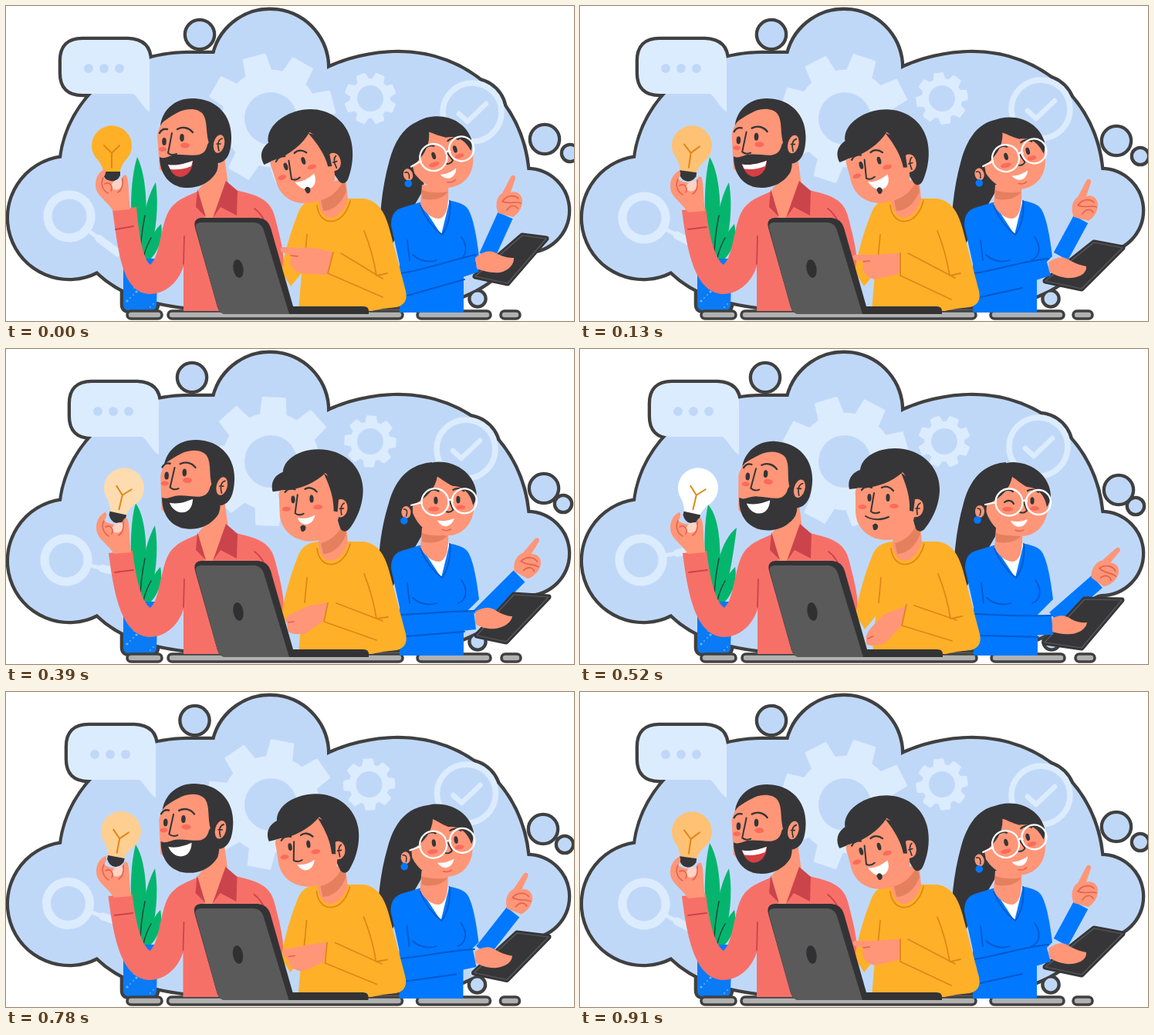
These frames come from a looping animation (736x409 px, 1.04 s). An HTML page:

```html
<!DOCTYPE html>
<html lang="en">
<head>
<meta charset="utf-8">
<title>Team at work</title>
<style>
html, body { margin: 0; width: 100%; height: 100%; overflow: hidden; background: #fff; }
svg { display: block; width: 736px; height: 409px; }
</style>
</head>
<body>
<svg id="stage" viewBox="0 0 736 409" fill="none" stroke-linecap="round" stroke-linejoin="round"></svg>
<script>
const stage = document.getElementById('stage');
const STEP = 130;
const SWING = [0, 1, 2, 3, 4, 3, 2, 1];
const INK = '#404040', HAIR = '#363638', SKY = '#c0d8f8', PALE = '#dcecff';
const SKIN = '#ff9678', SHADE = '#e5805f', BLUSH = '#fa6b5c', FOLD = '#e4614f';
const RED = '#f77068', WINE = '#cb444b', GOLD = '#ffb029', OCHRE = '#df8717';
const BLUE = '#0078ff', NAVY = '#0059cc', WHITE = '#fff';
let pose = 0;

// Mean of two strings, number by number
function mid(a, b) {
  const nums = String(b).match(/-?[\d.]+/g);
  let i = 0;
  return String(a).replace(/-?[\d.]+/g, n => (+n + +nums[i++]) / 2);
}
// Value for the current pose; the middle pose lies between b and c
const at = (a, b, c, d) => [a, b, mid(b, c), c, d][pose];

const path = (d, fill) => `<path d="${d}" fill="${fill}"/>`;
const line = (d, color, w = 2) => `<path d="${d}" stroke="${color}" stroke-width="${w}"/>`;
const dot = (xy, r, fill) => {
  const [x, y] = String(xy).split(',');
  return `<circle cx="${x}" cy="${y}" r="${r}" fill="${fill}"/>`;
};
const oval = (x, y, rx, ry, fill, turn = 0) =>
  `<ellipse cx="${x}" cy="${y}" rx="${rx}" ry="${ry}" fill="${fill}" transform="rotate(${turn} ${x} ${y})"/>`;
const ring = (x, y, r, color, w) =>
  `<circle cx="${x}" cy="${y}" r="${r}" stroke="${color}" stroke-width="${w}"/>`;
const group = (transform, ...parts) => `<g transform="${transform}">${parts.join('')}</g>`;

function gear(place, turn, body, hole, tip, half) {
  let teeth = '';
  for (let i = 0; i < 8; i++) {
    teeth += `<path d="M${body - 5},${-half - 2}L${tip},${-half}V${half}L${body - 5},${half + 2}Z" fill="${PALE}" stroke="${PALE}" stroke-width="3" transform="rotate(${i * 45})"/>`;
  }
  return group(`translate(${place}) rotate(${turn})`, teeth, ring(0, 0, (body + hole) / 2, PALE, body - hole));
}

function backdrop() {
  const cloud = 'M72,197.6C82,120 150,62 235,62Q254,62 270.2,62.1A74 74 0 0 1 416,82C440,70 475,61 508,61' +
    'C598,61 668,126 675.5,213A52.5 52.5 0 0 1 675.5,318C652,322 645,352 600,372L560,390H230' +
    'C190,385 150,375 118.1,344.1A78 78 0 1 1 72,197.6Z';
  const bubble = 'M99,44H158Q186,45 186,72V137C178,133 174,122 165,114H99Q72,114 72,87V71Q72,44 99,44Z';
  const slide = `translate(${at(0, 4, 12, 20)} 0)`;
  const check = at('604,138', '597,134', '596,130', '594,127');
  const pot = 'M152,328H197L195,389Q194,395 188,395H159Q152,395 152,387Z';
  const blobs = [
    path(cloud, SKY),
    dot(at('251,37', '248,37', '241,37', '240,37'), 17, SKY),
    dot(at('698,173', '695,175', '697,181', '698,183'), 17, SKY),
    dot(at('731,191', '726,195', '722,201', '720,204'), 9, SKY),
    dot(at('611,380', '610,380', '611,380', '611,380'), 8.5, SKY),
    dot(check, 42, SKY)
  ].join('');
  const potShape = path(pot, '#0a7af5');
  const tip = at('170,196', '168,196', '168,200', '166,202');
  const tip2 = at('194,229', '193,229', '193,229', '203,232');
  const tip3 = at('201,283', '200,283', '200,283', '201,283');
  let specks = '';
  for (let i = 0; i < 16; i++) {
    specks += dot(`${156 + (i * 17) % 38},${338 + (i * 29) % 54}`, i % 3 ? 0.9 : 1.6, '#6db8ff');
  }
  return `<g stroke="${INK}" stroke-width="8.6">${blobs}${group(slide, path(bubble, PALE))}${potShape}</g>` +
    blobs +
    gear('343,146', at(-15, -27, -42, -62), 63, 34, 82, 14) +
    gear(at('472,120', '469,120', '472,120', '472,120'), at(-22, -8, 3, 23), 26, 17, 32, 5) +
    group(`translate(${check})`, ring(0, 0, 38, PALE, 7.5), line('M-17,2L-6,12L18,-11', PALE, 6.5)) +
    group(`translate(${at('82,273', '83,275', '78,274', '79,274')}) rotate(${at(37, 28, 13, -11)})`,
      ring(0, 0, 28, PALE, 11), line('M33,0H48', PALE, 5), line('M48,0H79', PALE, 10)) +
    group(slide, path(bubble, PALE), [107, 127, 147].map(x => dot(`${x},81`, 6, SKY)).join('')) +
    path(`M173,330C158,290 160,228 ${tip}C182,220 185,265 178,330Z`, '#05b56d') +
    path(`M175,330C173,290 181,250 ${tip2}C199,265 193,305 182,330Z`, '#05b56d') +
    path(`M177,330C182,309 190,294 ${tip3}C204,302 197,319 186,330Z`, '#05b56d') +
    line('M180,272C176,292 174,305 174,326M188,301C184,308 180,318 178,327', '#24463c', 1.5) +
    potShape + specks;
}

function desk() {
  const bars = [[157, 45], [at(210, 209, 210, 210), 304], [at(533, 532, 533, 533), 95], [at(641, 639, 642, 642), 25]];
  return bars.map(([x, w]) =>
    `<rect x="${x}" y="396" width="${w}" height="10" rx="5" fill="#b1b1b1" stroke="${INK}" stroke-width="3.6"/>`).join('');
}

function bulb() {
  const glow = at('rgb(255,176,38)', 'rgb(255,193,115)', 'rgb(255,220,176)', 'rgb(255,255,255)');
  return group(`translate(${at('137,181', '146,181', '153,180', '153,180')}) rotate(${at(0, 8, 13, 13)})`,
    path('M-10,37Q-11,29 -17,20A26 26 0 1 1 17,20Q11,29 10,37Z', glow),
    line('M-10,0L0,10L10,0M0,10V29', OCHRE, 2),
    path('M-11,34H11V39Q7,47 0,47Q-7,47 -11,39Z', HAIR));
}

function bulbHand() {
  return group(`translate(${at('0,0', '2,2', '1,0', '1,0')})`,
    path('M139,266C128,250 116,246 116,232C116,223 120,216 127,212C131,213 129,219 126,223C132,227 140,229 149,227C151,221 153,218 156,220C160,230 158,240 161,264Z', SKIN),
    oval(144, 232, 8, 6, '#ffd3c4', -35),
    line('M126,223C122,230 125,239 132,243M128,231C135,227 139,235 136,240M151,224C152,234 150,239 145,242', FOLD, 1.6));
}

function beardedMan() {
  const cuff = 'M133,265L164,262C168,295 175,328 187,336C199,326 200,290 209,270';
  const torso = 'C217,252 235,247 250,240L298,239C326,246 343,250 349,276C353,292 357,306 359,322L364,396H230V338C222,362 204,374 186,374C150,372 ';
  const low = cuff + torso + '140,320 133,265Z';
  const high = 'M138,265L169,261C172,295 177,328 187,336C199,326 200,290 209,270' + torso + '146,320 138,265Z';
  const open = pose < 2;
  const mouth = open
    ? path('M210,206C222,208 233,204 242,201C242,214 234,222 225,222C217,221 213,214 210,206Z', '#d63f43') +
      path('M210,206C222,208 233,204 242,201L240,208C231,212 222,213 213,212Z', WHITE)
    : path('M209,203C220,205 230,201 239,197C239,209 233,215 225,215C218,215 212,210 209,203Z', WHITE);
  return path(at(high, low, low, low), RED) +
    line(at('M142,290L165,286', 'M141,290L165,287', 'M141,290L165,287', 'M141,290L165,287'), WINE, 1.8) +
    line('M231,299L230,335M322,263C333,271 340,287 344,306', WINE, 1.8) +
    path('M249,239L283,196L288,232L268,275L258,275Z', SKIN) +
    path('M285,227L300,240L299,272L278,261L268,275Z', WINE) +
    path('M248,238L259,274L246,261Z', WINE) +
    group(`translate(${at(0, 1, 3, 7)} ${at(0, 0, -2, 0)}) rotate(${at(0, 1, 2, 4)} 245 200)`,
      path('M200,156C202,136 218,120 241,120C273,120 292,142 292,170C292,190 287,201 276,204L255,200L220,150Z', HAIR),
      path('M196,168C198,157 202,151 207,148C214,143 219,140 225,137C237,132 249,133 255,140C262,150 258,166 264,181L262,215L225,236L199,212Z', SKIN),
      path('M199,196C206,200 212,193 222,193C240,192 257,200 261,180L268,168C274,188 277,204 273,215C264,231 247,237 233,236C212,235 199,218 199,196Z', HAIR),
      oval(276, 179, 7, 12, SKIN, 12),
      line('M280,172C274,174 274,181 276,188M273,179H278', HAIR, 1.7),
      group(`translate(${at('0,0', '0,-1', '-1,-8', '3,-8')})`,
        oval(232, 181, 6, 3.5, BLUSH), oval(203, 186, 5, 3, BLUSH),
        oval(205, 176, 2.8, 5, HAIR), oval(228, 171, 2.8, 5, HAIR),
        line('M199,165C201,161 204,159 209,160M222,160C229,156 237,158 242,164', HAIR, 2.4),
        line('M215,165L210,191Q215,195 221,192', HAIR, 2)),
      mouth) +
    bulb() + bulbHand();
}

function laptop() {
  return path('M253,275H327Q339,276 343,288L372,390H463Q470,390 470,396V400H285Q277,400 274,391L245,288Q242,276 253,275Z', '#333335') +
    path('M252,281H322Q331,282 334,291L367,400H285Q277,400 274,391L246,289Q244,282 252,281Z', '#5a5a5a') +
    oval(301, 341, 6.5, 12, '#303032', -10);
}

function youngMan() {
  const mouth = pose < 2
    ? path('M373,216C383,219 391,217 400,213C401,224 395,230 388,230C381,230 376,224 373,216Z', WHITE)
    : pose < 4
      ? path('M377,217C385,219 392,218 400,214C398,222 393,226 387,226C382,225 379,222 377,217Z', WHITE)
      : line('M370,217C378,222 390,223 400,218', HAIR, 2);
  const chin = at(10, 7, 4, 0);
  return path('M405,250C390,251 382,258 378,270C368,295 361,320 357,345L369,364L383,347L379,396H474C490,392 498,392 506,391C518,388 520,380 518,370L497,290C490,264 480,252 463,250Z', GOLD) +
    line('M390,297L387,329M464,292C472,312 477,331 480,350', OCHRE, 1.8) +
    path('M406,235L405,256C408,280 432,284 443,251L440,222Z', SKIN) +
    path('M408,252C422,249 432,238 438,225L441,240C436,255 424,266 411,266Z', SHADE) +
    line('M403,259C406,287 437,288 446,253', OCHRE, 1.8) +
    path(at(
      'M424,320C407,315 394,313 384,314L358,313C354,314 355,319 359,320L371,324C364,333 371,345 383,347L416,349Z',
      'M416,321C405,321 394,322 384,323L357,323C353,324 354,329 358,330L369,332C364,342 370,352 383,355L414,348Z',
      'M417,329C405,332 394,332 384,337L367,345C362,348 361,352 364,355L365,365C366,370 377,371 387,370L410,354Z',
      'M423,333C413,339 401,340 392,346L380,359C374,365 370,371 371,377L371,383C375,386 386,386 395,382L417,359Z'), SKIN) +
    line(at('M369,324L378,325', 'M368,332L376,331', 'M366,355L373,354', 'M373,376L380,373'), FOLD, 1.6) +
    line(at(
      'M424,320L417,347L488,378M434,321L488,354M481,350L494,347',
      'M416,321L416,350L482,381M426,321L487,353M481,350L494,347',
      'M417,330L412,354L480,378M428,330L488,353M481,350L495,348',
      'M423,332L417,359L482,379M433,333L488,352M481,350L495,347'), OCHRE, 1.8) +
    group(`translate(${at('-13,12', '-10,11', '-3,2', '0,0')}) rotate(${at(-18, -15, -2, 0)} 386 193)`,
      path('M349,182C346,168 354,160 363,157C365,140 385,129 408,129C441,129 466,152 466,182C466,203 456,222 447,233C443,238 438,238 435,233L425,200L368,180Z', HAIR),
      path('M357,192C356,181 358,179 364,181C385,180 405,172 418,160C425,166 428,185 431,197C437,192 446,196 445,207C444,216 438,219 433,218C430,237 418,248 398,248C374,248 357,232 357,210Z', SKIN),
      path('M416,161C428,166 434,183 434,195L432,211L427,210C428,195 424,179 416,161Z', HAIR),
      line('M441,200C436,202 436,208 437,215M435,207H440', HAIR, 1.7),
      oval(366, 205, 5.5, 3, BLUSH), oval(407, 204, 6, 3, BLUSH),
      oval(375, 193, 2.6, 5, HAIR), oval(399, 193, 2.6, 5, HAIR),
      line('M365,183C368,179 373,178 378,180M391,180C396,177 402,179 406,184', HAIR, 2.3),
      line('M381,187L377,211Q382,215 388,212', HAIR, 2),
      group(`translate(${chin * 0.7} 0)`, mouth),
      path(`M${379 + chin},229Q${383 + chin},224 ${386 + chin},229C${387 + chin},234 ${382 + chin},237 ${380 + chin},234Z`, HAIR));
}

function glassesWoman() {
  const wink = pose === 4;
  const tablet = at('M669,298L700,302L650,360L608,351Z', 'M667,307L704,314L651,367L604,357Z',
    'M658,319L703,322L648,380L610,372Z', 'M654,325L702,326L650,388L602,381Z');
  const forearm = at('M623,325L647,272', 'M624,325L650,277', 'M612,348L665,295', 'M615,350L670,302');
  return path(at(
      'M546,147C516,150 503,178 497,200C488,232 485,262 484,292L500,310L540,240L550,170Z',
      'M544,147C514,150 501,178 495,200C486,232 483,262 482,290L500,310L540,240L550,170Z',
      'M552,147C516,150 502,178 496,200C486,232 483,262 482,290L500,310L540,240L550,170Z',
      'M552,147C516,150 503,178 497,200C488,232 485,262 484,292L500,310L540,240L550,170Z'), HAIR) +
    `<path d="${forearm}" stroke="${BLUE}" stroke-width="21" stroke-linecap="butt"/>` +
    group(`translate(${at('647,272', '650,277', '667,294', '670,303')}) rotate(${at(0, 0, 13, 21)})`,
      path('M-9,-3C-14,-13 -11,-25 -4,-29L7,-50C9,-54 14,-52 13,-48L7,-30C15,-33 22,-27 22,-19C22,-9 16,-2 10,2Z', SKIN),
      line('M-4,-18C2,-27 12,-27 17,-22M-3,-18C5,-14 13,-19 20,-16M2,-7C6,-14 13,-14 16,-9', FOLD, 1.6)) +
    path('M536,255L516,261C504,264 499,271 499,285L510,335V398H593V345L613,325C610,300 606,278 600,266C596,258 588,255 572,252Z', BLUE) +
    path('M538,257L564,297L575,252Z', WHITE) +
    path('M539,232L537,259C543,268 552,277 562,276C571,273 574,260 573,235Z', SKIN) +
    path('M539,239C550,243 563,243 573,241C567,250 552,254 539,250Z', SHADE) +
    line('M537,259C544,277 553,288 565,297C573,286 577,269 575,253', NAVY, 1.9) +
    line('M520,304L523,330M590,300C599,312 597,326 586,330M527,323C537,332 548,333 558,330', NAVY, 1.8) +
    `<path d="${tablet}" fill="${HAIR}" stroke="${HAIR}" stroke-width="7"/>` +
    line(tablet, '#5b5b60', 1.2) +
    path(at(
      'M515,347L606,323L613,345L520,376Z', 'M515,347L605,329L611,350L520,378Z',
      'M515,344L606,340L609,364L520,374Z', 'M515,345L611,346L613,371L520,373Z'), BLUE) +
    line(at(
      'M512,347C545,342 575,330 609,323M520,376L594,355', 'M512,347C545,342 575,331 608,328M520,378L574,366',
      'M512,345C545,344 575,340 607,340M519,373L594,367', 'M512,344C545,346 580,347 611,346M519,372L594,374'), NAVY, 1.9) +
    path(at(
      'M608,327C619,318 627,316 637,322C645,326 651,327 658,327C659,335 651,344 640,346C628,347 618,344 610,341Z',
      'M608,333C619,325 627,324 637,331C645,335 651,337 657,338C658,346 650,352 638,353C626,354 616,349 609,345Z',
      'M608,341C619,335 628,334 637,341C645,345 651,347 656,347C655,355 646,361 635,363C624,364 616,362 608,357Z',
      'M612,350C621,345 628,345 637,351C645,355 651,356 657,355C656,363 647,369 637,370C626,371 619,369 612,367Z'), SKIN) +
    group(`translate(${at('-3,-8', '-4,-6', '0,-1', '0,0')}) rotate(${at(-17, -14, -2, 0)} 575 199)`,
      path('M522,192C522,170 545,160 570,162C595,165 608,180 607,201C606,228 591,243 572,243C546,243 527,231 522,192Z', SKIN),
      path('M511,222C505,178 530,147 562,147C589,148 609,167 610,190C609,198 607,203 605,205C602,188 592,180 579,179C570,174 565,169 560,166C557,181 547,193 527,202L525,234C514,233 512,229 511,222Z', HAIR),
      oval(518, 211, 6, 8, SKIN), line('M515,207C520,207 520,211 518,216', HAIR, 1.5),
      dot('515,222', 4.8, BLUE),
      oval(554, 208, 7, 3, BLUSH), oval(589, 207, 6, 3, BLUSH),
      wink ? line('M550,199C555,195 560,197 562,201', HAIR, 2.2) : oval(557, 197, 2.6, 4.8, HAIR),
      oval(586, 197, 2.6, 4.8, HAIR),
      line('M547,186C551,182 557,182 561,185M580,184C585,181 591,183 594,186', HAIR, 2.2),
      line('M573,194L579,210Q575,214 570,212', HAIR, 1.9),
      ring(556, 199, 17.5, WHITE, 2.3), ring(594, 199, 16, WHITE, 2.3),
      line('M525,202L539,199M573,198Q576,195 579,198', WHITE, 2.2),
      path('M558,223C566,225 573,224 580,221C578,228 573,231 568,231C563,230 560,227 558,223Z', WHITE),
      line('M564,235C568,237 572,237 575,235', FOLD, 1.5));
}

function draw() {
  const shift = `translate(${at(0, -1, 0, 0)} 0)`;
  stage.innerHTML = backdrop() + desk() + group(shift, beardedMan(), glassesWoman(), youngMan(), laptop());
}

let shown = -1;
function tick() {
  pose = SWING[Math.floor(performance.now() / STEP) % SWING.length];
  if (pose !== shown) {
    shown = pose;
    draw();
  }
  requestAnimationFrame(tick);
}
tick();
</script>
</body>
</html>
```
